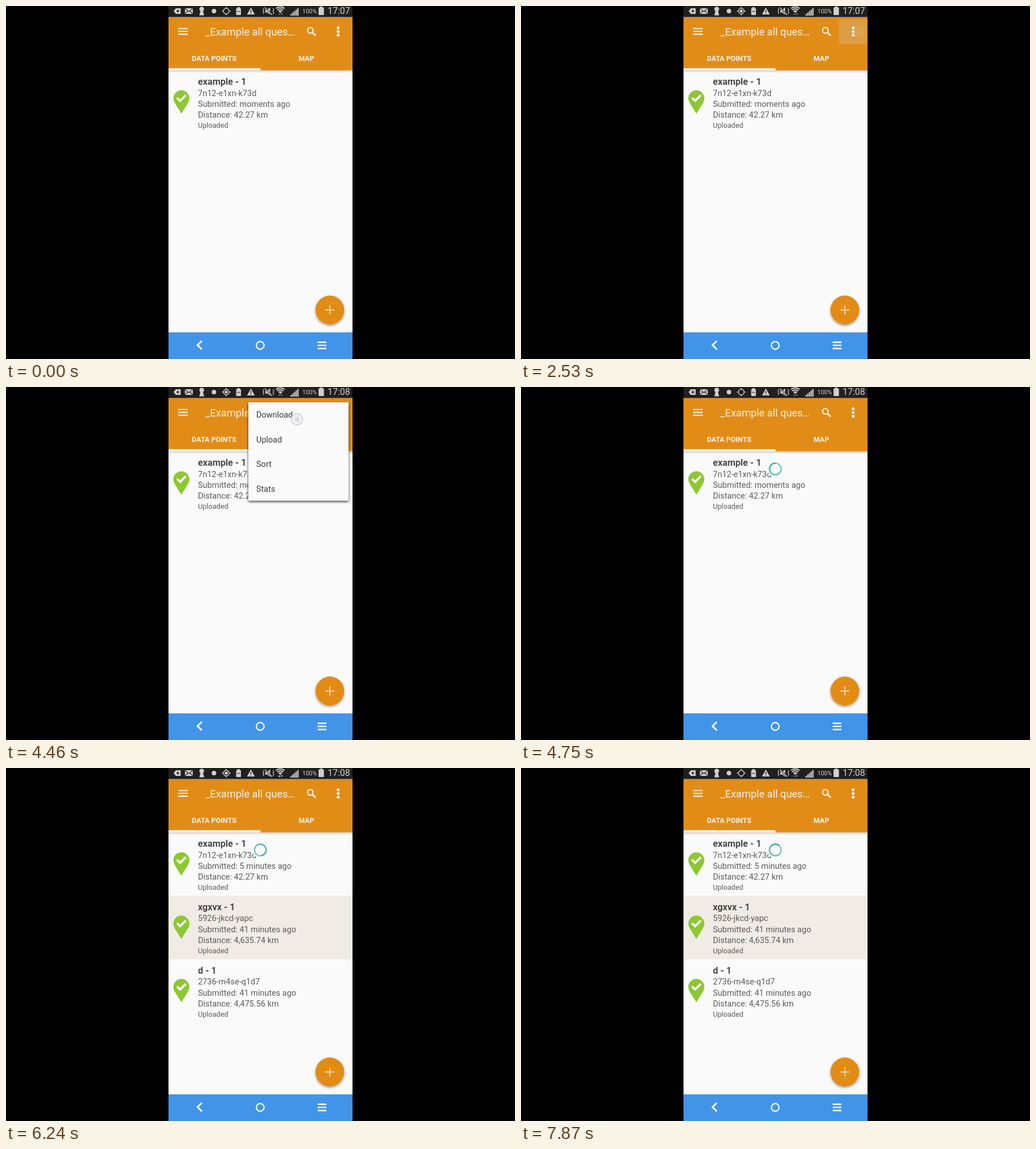
An HTML page that plays this animation: 899 px wide and 623 px high, repeating every 8 s.

```html
<!DOCTYPE html>
<html lang="en">
<head>
<meta charset="utf-8">
<title>Data point sync</title>
<style>
html, body { margin: 0; width: 100%; height: 100%; overflow: hidden; background: #000; }
svg { display: block; width: 899px; height: 623px; font-family: Roboto, "Noto Sans", sans-serif; }
</style>
</head>
<body>
<svg id="stage" viewBox="0 0 899 623"></svg>
<script>
const LOOP = 8000, STEP = 148.4;
const ORANGE = '#e28c18', PAPER = '#fafafa', ICON = '#cfcfcf';

const rect = (x, y, w, h, fill, more = '') =>
  `<rect x="${x}" y="${y}" width="${w}" height="${h}" fill="${fill}" ${more}/>`;
const circle = (x, y, r, fill, more = '') =>
  `<circle cx="${x}" cy="${y}" r="${r}" fill="${fill}" ${more}/>`;
const line = (d, color, width, more = '') =>
  `<path d="${d}" fill="none" stroke="${color}" stroke-width="${width}" ${more}/>`;
const shape = (d, fill) => `<path d="${d}" fill="${fill}"/>`;
const text = (x, y, size, fill, str, more = '') =>
  `<text x="${x}" y="${y}" font-size="${size}" fill="${fill}" ${more}>${str}</text>`;
const group = (id, body) => `<g id="${id}">${body}</g>`;

function row(y, name, code, age, km, ageId = '') {
  const pin = shape(`M309.7 ${y + 76}L298.2 ${y + 57.5}Q295.5 ${y + 53} 295.5 ${y + 49}a14.2 14.2 0 0 1 28.4 0Q323.9 ${y + 53} 321.2 ${y + 57.5}z`, '#8cc832');
  return pin +
    line(`M302 ${y + 48}l5.6 5.4 10-10`, '#fff', 3.8) +
    text(339, y + 25, 16.2, '#484848', name, 'font-weight="700"') +
    text(339, y + 44.5, 14.5, '#5c5c5c', code) +
    text(339, y + 64, 14.5, '#5c5c5c', `Submitted: <tspan ${ageId}>${age}</tspan> ago`) +
    text(339, y + 83.3, 14.5, '#5c5c5c', `Distance: ${km} km`) +
    text(339, y + 101, 12.7, '#5c5c5c', 'Uploaded');
}

function statusBar() {
  const bars = [0, 1, 2, 3, 4].map(i =>
    rect(502.5 + i * 3, 14 - i * 2.6, 2.2, 3 + i * 2.6, ICON)).join('');
  const waves = [5, 8.5, 12].map(r =>
    line(`M${484.5 - r * .64} ${13.5 - r * .77}A${r} ${r} 0 0 1 ${484.5 + r * .64} ${13.5 - r * .77}`, ICON, 2)).join('');
  return rect(287, 0, 325, 19.5, '#202020') +
    shape('M296 9l4-5h8.5v10H300z', ICON) + line('M301 9h5M303.5 6.5v5', '#202020', 1.6) +
    rect(316, 4, 14, 10, ICON) +
    line('M316.5 4.5l6.5 5.5 6.5-5.5M316.5 13.5l4.5-4.5M329.5 13.5l-4.5-4.5', '#202020', 1.1) +
    circle(345.7, 5.5, 4.2, ICON) + shape('M343.5 8h4.4l2 8.5h-8.4z', ICON) +
    circle(367.3, 9, 4, ICON) +
    circle(389, 9, 5, 'none', `stroke="${ICON}" stroke-width="1.3"`) +
    line('M389 1.5v3M389 13.5v3M381.5 9h3M393.5 9h3', ICON, 1.3) +
    rect(408.5, 2, 4.5, 3, ICON) + rect(406.5, 4, 8.5, 12, ICON, 'rx="1"') + line('M408 9.5h5.5', '#555', 1.5) +
    shape('M432.5 2.5l6.8 12.5h-13.6z', ICON) + line('M432.5 7v4M432.5 12.2v1.5', '#202020', 1.5) +
    shape('M458 6.5h3.5l5-4v13l-5-4H458z', ICON) +
    line('M457 2.5l13 13', '#202020', 3) + line('M457 2.5l13 13', ICON, 1.5) +
    line('M454 4l1.5 2.5-1.5 2.5 1.5 2.5-1.5 2.5M471.5 4l1.5 2.5-1.5 2.5 1.5 2.5-1.5 2.5', ICON, 1.2) +
    waves + circle(484.5, 10.5, 1.5, ICON) +
    group('traffic', shape('M480.8 15.5l2-3 2 3zM485 13l2 3 2-3z', ICON)) +
    bars + text(523.5, 13.2, 10.5, ICON, '100%') +
    rect(554.5, 1, 4.5, 2.5, ICON) + rect(552, 2.5, 9.5, 13.5, ICON, 'rx="1"') +
    text(568, 14.2, 16, '#d0d0d0', '17:07', 'id="clock"') +
    group('gps', circle(389, 9, 2.7, ICON));
}

function header() {
  return rect(287, 113, 325, 5, 'url(#drop)') +
    rect(287, 19.5, 325, 94, ORANGE) +
    rect(287, 109.8, 162.5, 4, '#f8f5f0') +
    line('M304 39.7h17M304 44.8h17M304 49.9h17', '#fbf1e4', 2.1) +
    text(352, 52, 18.3, '#fbf1e4', '_Example all ques…') +
    circle(537.5, 43, 4.9, 'none', 'stroke="#fff" stroke-width="2"') +
    line('M541 46.5l6 5.8', '#fff', 2.6) +
    [38.5, 45, 51.5].map(y => circle(586.7, y, 2.5, '#fff')).join('') +
    text(328.3, 97, 12.5, '#fcf3e8', 'DATA POINTS', 'font-weight="700"') +
    text(516.8, 97, 12.5, '#fcf3e8', 'MAP', 'font-weight="700"');
}

function navigation() {
  return circle(572, 536.5, 25.4, ORANGE, 'filter="url(#lift)"') +
    line('M564 536.5h16M572 528.5v16', '#fbe9d0', 1.5) +
    rect(287, 576, 325, 47, '#4194e8') +
    line('M346 591l-7.8 7.5 7.8 7.5', '#fff', 3) +
    circle(449, 599, 6.8, 'none', 'stroke="#fff" stroke-width="2.2"') +
    line('M550.5 593.5h15.5M550.5 599h15.5M550.5 604.5h15.5', '#fff', 2.6);
}

function spinner() {
  const parts = 24, len = 2 * Math.PI * 10.2, arc = len / parts;
  let ring = '';
  for (let i = 0; i < parts; i++)
    ring += circle(0, 0, 10.2, 'none', `stroke="#2ba79c" stroke-width="2.6" stroke-opacity="${.55 + .45 * i / parts}" stroke-dasharray="${arc} ${len - arc}" transform="rotate(${i * 360 / parts})"`);
  return circle(449.2, 144.6, 14, PAPER) + `<g id="ring">${ring}</g>`;
}

const menu = rect(428, 27, 177, 173.5, PAPER, 'filter="url(#float)"') +
  group('pressedItem', rect(428, 27, 177, 43.5, '#dedede')) +
  ['Download', 'Upload', 'Sort', 'Stats'].map((s, i) =>
    text(442, 54 + i * 43.5, 14.5, '#3c3c3c', s)).join('');

const touch = circle(0, 0, 10, '#eeeef2', 'fill-opacity=".7" stroke="#c6c6d2" stroke-width="1.3"') +
  circle(0, 0, 4.5, '#d9d9e4');

const shadow = (id, drop, blur, alpha) =>
  `<filter id="${id}" x="-20%" y="-20%" width="140%" height="140%"><feDropShadow dx="0" dy="${drop}" stdDeviation="${blur}" flood-opacity="${alpha}"/></filter>`;

const stage = document.getElementById('stage');
stage.innerHTML = `<defs>
  <linearGradient id="drop" x2="0" y2="1"><stop stop-color="#cfcfcf"/><stop offset=".6" stop-color="#e4e4e4"/><stop offset="1" stop-color="${PAPER}"/></linearGradient>
  ${shadow('lift', 2, 2, .4)}${shadow('float', 2, 2.2, .8)}
</defs>` +
  rect(0, 0, 899, 623, '#000') + rect(287, 0, 325, 623, PAPER) +
  header() + statusBar() +
  row(114, 'example - 1', '7n12-e1xn-k73d', 'moments', '42.27', 'id="age"') +
  group('extra', rect(287, 225.5, 325, 112, '#f0ebe5') +
    row(225.8, 'xgxvx - 1', '5926-jkcd-yapc', '41 minutes', '4,635.74') +
    row(337.5, 'd - 1', '2736-m4se-q1d7', '41 minutes', '4,475.56')) +
  navigation() + group('spinner', spinner()) +
  group('pressedDots', rect(561.5, 23, 50.5, 44, '#d0d0d0', 'opacity=".24"')) +
  group('menu', menu) + group('touch', touch);

const parts = Object.fromEntries(['gps', 'traffic', 'clock', 'age', 'extra', 'spinner', 'ring',
  'pressedDots', 'menu', 'pressedItem', 'touch'].map(id => [id, document.getElementById(id)]));
const fade = (id, a) => parts[id].setAttribute('opacity', +a);
const write = (id, s) => { if (parts[id].textContent !== s) parts[id].textContent = s; };

function draw(now) {
  const k = Math.floor(now % LOOP / STEP), beat = k % 13;
  fade('gps', k < 53 && (beat >= 1 && beat < 5 || beat >= 8 && beat < 11));
  fade('traffic', k === 4 || k > 34 && k % 5 === 2 ? 1 : .55);
  write('clock', k < 30 ? '17:07' : '17:08');

  fade('pressedDots', k === 17);
  fade('menu', k < 18 || k > 31 ? 0 : k === 18 ? .6 : 1);
  fade('pressedItem', k === 31);
  parts.touch.setAttribute('transform', k < 20 ? 'translate(597 45)' : 'translate(514 57)');
  fade('touch', { 16: .5, 17: .1, 30: 1, 31: .4 }[k] || 0);

  fade('spinner', k > 31);
  parts.ring.setAttribute('transform', `translate(449.2 144.6) rotate(${k * STEP * .36})`);
  const synced = k >= 40;
  fade('extra', synced);
  write('age', synced ? '5 minutes' : 'moments');
}

const start = performance.now();
function tick() {
  draw(performance.now() - start);
  requestAnimationFrame(tick);
}
tick();
</script>
</body>
</html>
```
